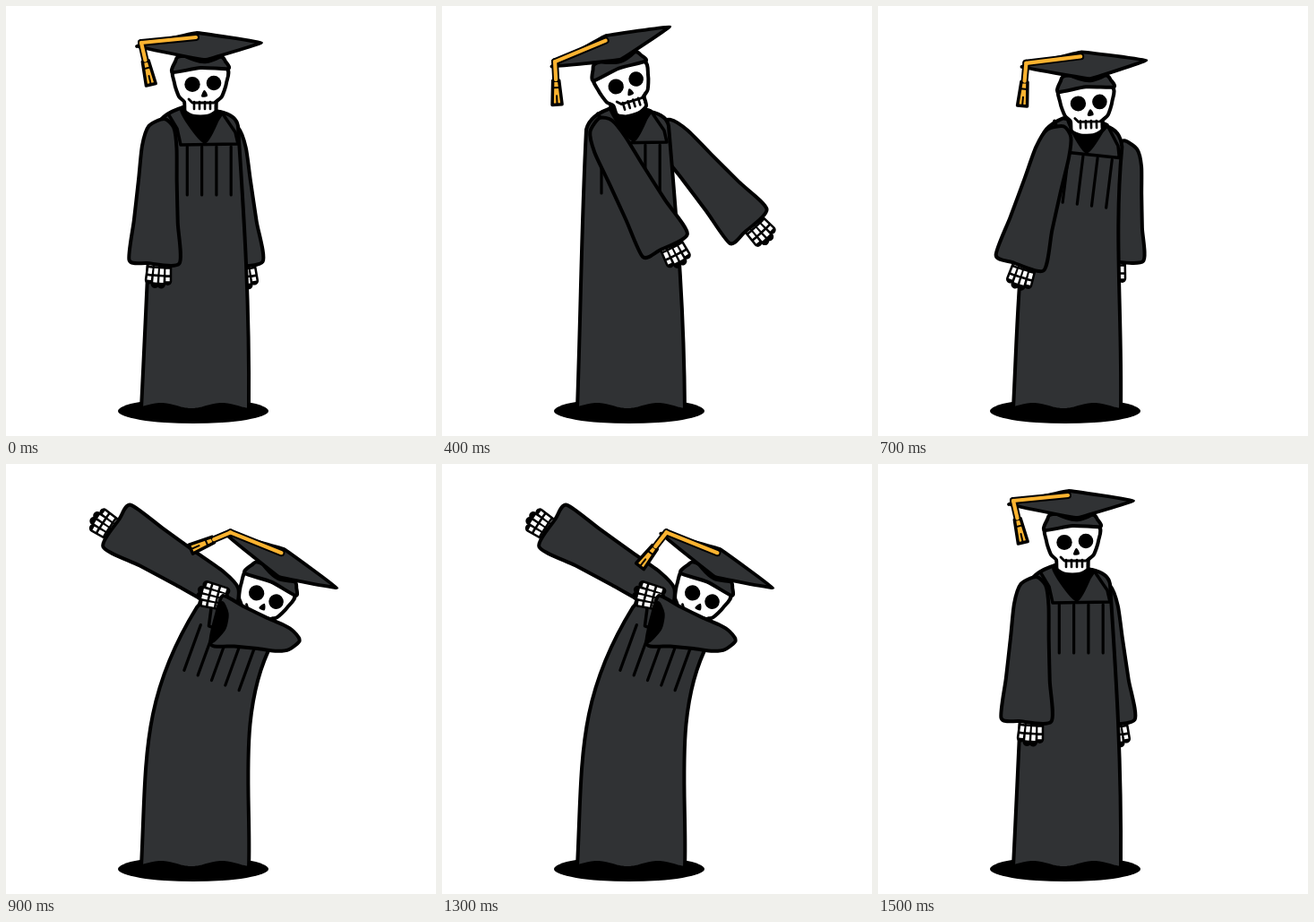
Write an HTML page with a canvas that moves like this. It is 480x480 px and loops after 1600 ms.

```html
<!DOCTYPE html>
<html lang="en">
<head>
<meta charset="utf-8">
<title>Dabbing graduate</title>
<style>
  html, body { margin: 0; width: 100%; height: 100%; overflow: hidden; background: #fff; }
  canvas { display: block; width: 480px; height: 480px; }
</style>
</head>
<body>
<canvas id="stage" width="480" height="480"></canvas>
<script>
const ctx = document.getElementById('stage').getContext('2d');
const LOOP = 1600, STEP = 50, LAST = 1500;
const ROBE = '#303234', GOLD = '#fbb330', INK = '#000';
const SLEEVE = 151;
const mix = (a, b, k) => a + (b - a) * k;
const smooth = k => k * k * (3 - 2 * k);
const rad = deg => deg * Math.PI / 180;

// head, yoke: [x, y, angle]; arms: [x, y, angle, length]; body: [lean, sway]
const STAND = {
  head: [220, 87, 0], left: [176, 135, 94, 1], right: [243, 138, 84, 1],
  yoke: [219, 155, 0], body: [0, 0], tassel: [13]
};
const DAB = {
  head: [290.5, 149, 27.5], left: [250, 152, 213.3, 1], right: [319, 195, 194, 0.57],
  yoke: [249, 189, 20], body: [1, 0], tassel: [-68]
};
const KEYS = [
  { t: 0, ...STAND },
  { t: 200, head: [223.5, 87, 0.5], left: [182, 134, 83.3, 1], right: [240, 137, 67.8, 1],
    yoke: [219, 154, 0], body: [0, 0], tassel: [-41] },
  { t: 400, head: [205.5, 86, -17], left: [180, 133, 62.8, 1], right: [243, 138, 47.5, 0.97],
    yoke: [211, 153, 0], body: [0, -6], tassel: [3] },
  { t: 600, head: [205.5, 86, -17], left: [180, 138, 50.6, 1], right: [250, 140, 38, 0.96],
    yoke: [219, 153, 0], body: [0, 0], tassel: [29] },
  { t: 850, ...DAB },
  { t: 1300, ...DAB, tassel: [-38] },
  { t: 1500, ...STAND }
];
// Robe side curves: two handles, shoulder, neck; upright and leaning.
const SIDES = {
  left: [[[157, 330], [157, 330]], [[160, 240], [150, 262]], [[167, 138], [213, 160]], [[198, 113], [222, 148]]],
  right: [[[272, 330], [274, 370]], [[266, 240], [258, 275]], [[259, 134], [297, 200]], [[239, 118], [285, 165]]]
};
const HALF_SKULL = [[28, -18], [29, -1], [24, 14], [18, 20], [17, 31], [7, 36]];

function poseAt(time) {
  const next = Math.max(1, KEYS.findIndex(key => key.t >= time));
  const a = KEYS[next - 1], b = KEYS[next];
  const k = (time - a.t) / (b.t - a.t);
  const pose = {};
  for (const part of Object.keys(STAND)) {
    pose[part] = a[part].map((v, i) => mix(v, b[part][i], smooth(k)));
  }
  return pose;
}

function paint(fill, width) {
  ctx.fillStyle = fill;
  ctx.fill();
  ctx.strokeStyle = INK;
  ctx.lineWidth = width;
  if (width) ctx.stroke();
}

// Closed outline with slightly softened corners.
function outline(points, fill, width = 4, soft = 0.12) {
  const n = points.length;
  ctx.beginPath();
  ctx.moveTo(...points[0]);
  for (let i = 0; i < n; i++) {
    const [p, a, b, q] = [n - 1, 0, 1, 2].map(step => points[(i + step) % n]);
    ctx.bezierCurveTo(a[0] + (b[0] - p[0]) * soft, a[1] + (b[1] - p[1]) * soft,
      b[0] - (q[0] - a[0]) * soft, b[1] - (q[1] - a[1]) * soft, ...b);
  }
  paint(fill, width);
}

function line(points, width, color = INK) {
  ctx.beginPath();
  points.forEach(p => ctx.lineTo(...p));
  ctx.strokeStyle = color;
  ctx.lineWidth = width;
  ctx.stroke();
}

function oval(x, y, rx, ry) {
  ctx.beginPath();
  ctx.ellipse(x, y, rx, ry, 0, 0, Math.PI * 2);
  paint(INK, 0);
}

function placed(x, y, angle, draw) {
  ctx.save();
  ctx.translate(x, y);
  ctx.rotate(rad(angle));
  draw();
  ctx.restore();
}

function drawHand(x, y) {
  const fingers = [-1.5, -0.5, 0.5, 1.5].map(i => {
    const fy = y + i * 7;
    return [[x - 13, y + i * 6], [x + 14 - i * i * 2, fy]];
  });
  fingers.forEach(finger => line(finger, 9.5));
  ctx.save();
  ctx.lineCap = 'butt';
  ctx.setLineDash([6.5, 2.6]);
  fingers.forEach(finger => line(finger, 4.4, '#fff'));
  ctx.restore();
}

// The sleeve flares from the shoulder to the cuff, more strongly on the inner side.
function sleeve(end, outerSide, fold) {
  const edge = side => [0, 0.15, 0.4, 0.7, 1].map(k => {
    const shoulder = (side === outerSide ? 22 : 15) * (1 - 0.25 * fold);
    return [end * k, side * mix(shoulder, 28, Math.pow(k, 1.3)) * (k ? 1 : 0.75)];
  });
  return [...edge(-1), [end + 2, 8], ...edge(1).reverse(), [-9, 0]];
}

function drawArm([x, y, angle, length], outerSide, fold = 0) {
  const end = SLEEVE * length;
  placed(x, y, angle, () => {
    drawHand(end + 11, mix(-6, 25, fold));
    outline(sleeve(end, outerSide, fold), ROBE);
    if (fold > 0.5) outline([[end, -25], [end - 11, -8], [end - 10, 10], [end, 20]], INK, 2);
  });
}

function drawBody([lean, sway]) {
  const bend = (side, weights) => SIDES[side].map(([up, bent], i) =>
    [mix(up[0], bent[0], lean) + sway * weights[i], mix(up[1], bent[1], lean)]);
  const weights = [0.3, 0.7, 1, 1];
  const [l1, l2, lShoulder, lNeck] = bend('left', weights);
  const [r1, r2, rShoulder, rNeck] = bend('right', weights);
  const hem = x => 448 + 3 * Math.cos((x - 207) * Math.PI / 34);
  ctx.beginPath();
  ctx.moveTo(151, hem(151));
  ctx.bezierCurveTo(...l1, ...l2, ...lShoulder);
  ctx.quadraticCurveTo(lShoulder[0] + 4, lNeck[1] + 8, ...lNeck);
  ctx.lineTo(...rNeck);
  ctx.quadraticCurveTo(rShoulder[0] - 2, rNeck[1] + 4, ...rShoulder);
  ctx.bezierCurveTo(...r2, ...r1, 271, hem(271));
  for (let x = 271; x >= 151; x -= 4) ctx.lineTo(x, hem(x));
  ctx.closePath();
  paint(ROBE, 4);
}

function drawYoke([x, y, angle]) {
  placed(x, y, angle, () => {
    outline([[-22, -42], [20, -37], [17, -27], [3, -3], [-17, -26]], INK, 3);
    line([[-37, -33], [-28, -18], [-24, 0], [40, -1], [37, -14], [22, -36]], 3.5);
    for (let px = -33; px <= 33; px += 16.3) line([[px, 2], [px, 56]], 3.2);
  });
}

function drawTassel(angle) {
  const cord = [[-8, -52], [-69, -46]];
  const strand = [[0, 0], [0, 20]];
  line(cord, 8);
  placed(...cord[1], angle, () => {
    line(strand, 8);
    outline([[-3.5, 21], [3.5, 21], [5.5, 48], [-5.5, 48]], GOLD, 3.5, 0);
    line([[-4, 29], [4, 29]], 2);
    line([[0, 38], [0, 48]], 2);
    line(strand, 4.2, GOLD);
  });
  line(cord, 4.2, GOLD);
}

function drawHead([x, y, angle], tassel) {
  placed(x, y, angle, () => {
    const mirrored = HALF_SKULL.map(([px, py]) => [-3 - px, py]).reverse();
    outline([...HALF_SKULL.map(([px, py]) => [px - 3, py]), ...mirrored], '#fff');
    oval(-12, 0.5, 8.7, 8.5);
    oval(12, -1, 8.3, 8.3);
    outline([[1.5, 8], [4, 13], [-1, 13.5]], INK, 2);
    line([[-16, 17], [-12, 21], [12, 21], [17, 17]], 2.8);
    for (let tooth = -10; tooth <= 14; tooth += 6) line([[tooth, 20], [tooth, 28]], 2.6);
    outline([[-34, -13], [-31, -25], [-25, -31], [18, -31], [25, -25], [28, -17], [-3, -18]], ROBE);
    outline([[-26, -34], [20, -31], [4, -24], [-10, -26]], INK, 2);
    outline([[-74, -42], [-7, -57], [65, -46], [2, -27]], ROBE, 3.8, 0.02);
    drawTassel(-tassel - angle);
  });
}

function draw(time) {
  const pose = poseAt(time);
  const lean = pose.body[0], inFront = lean > 0.4;
  const rightArm = () => drawArm(pose.right, -1, lean);
  ctx.fillStyle = '#fff';
  ctx.fillRect(0, 0, 480, 480);
  ctx.lineCap = ctx.lineJoin = 'round';
  oval(209, 452, 84, 14);
  if (!inFront) rightArm();
  drawBody(pose.body);
  drawYoke(pose.yoke);
  drawArm(pose.left, 1);
  drawHead(pose.head, pose.tassel[0]);
  if (inFront) rightArm();
}

const start = performance.now();
function tick() {
  const time = (performance.now() - start) % LOOP;
  draw(Math.min(LAST, Math.floor(time / STEP) * STEP));
  requestAnimationFrame(tick);
}
tick();
</script>
</body>
</html>
```
